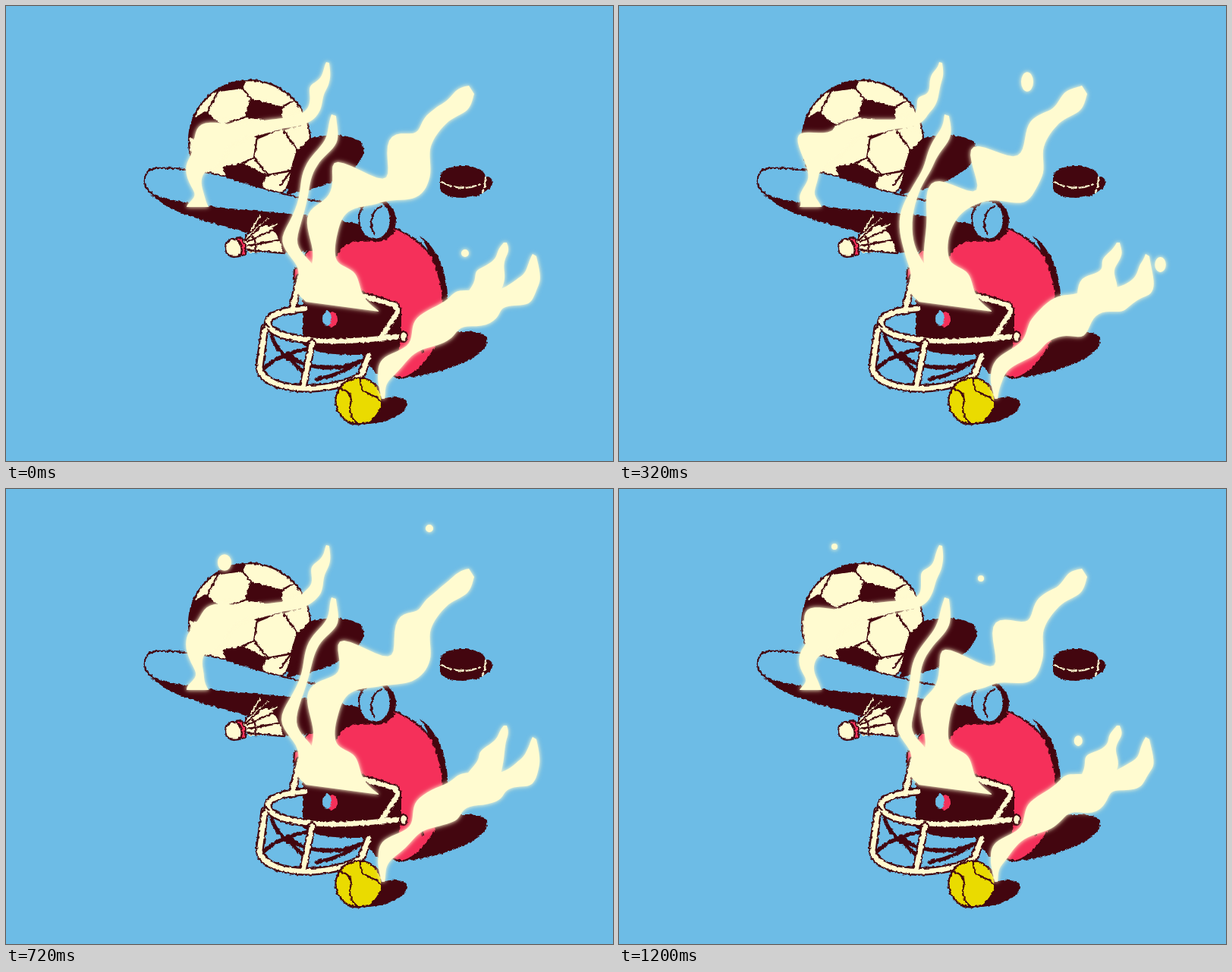
These frames come from a looping animation (800x600 px, 1280 ms). An HTML page:

```html
<!DOCTYPE html>
<html lang="en">
<head>
<meta charset="utf-8">
<title>Smoking sports gear</title>
<style>
html, body { margin: 0; width: 100%; height: 100%; overflow: hidden; background: #6dbce6; }
svg { display: block; width: 100%; height: 100%; }
.dark { fill: #43060f; }
.pink { fill: #f5305a; }
.blue { fill: #6dbce6; }
.cream { fill: #fffbd0; }
.line { fill: none; }
.edge, .line { stroke: #43060f; stroke-width: 2.3; stroke-linecap: round; stroke-linejoin: round; }
.line.pale { stroke: #fffbd0; }
.line.thick { stroke-width: 5; }
#smoke { fill: #fffbd0; filter: drop-shadow(0 0 2px #fffbd0b0) drop-shadow(0 0 3px #fffbd0a0); }
</style>
</head>
<body>
<svg viewBox="0 0 800 600">
<defs>
  <filter id="rough" filterUnits="userSpaceOnUse" x="0" y="0" width="800" height="600" color-interpolation-filters="sRGB">
    <feTurbulence type="fractalNoise" baseFrequency=".22" numOctaves="2" seed="4"/>
    <feDisplacementMap in="SourceGraphic" scale="4" xChannelSelector="R" yChannelSelector="G"/>
  </filter>
  <clipPath id="round"><circle cx="321" cy="178" r="80"/></clipPath>
  <g id="cage" fill="none" stroke-linecap="round" stroke-linejoin="round">
    <path d="M351,409Q370,400 394,399M387,358L377,402M341,424L334,478C345,515 440,508 468,487L478,461"/>
    <path d="M351,409C325,430 390,454 520,435M464,380L510,394Q518,398 515,405L495,436M403,446L391,504"/>
  </g>
</defs>

<g filter="url(#rough)">
  <!-- shadows on the ground -->
  <g class="dark">
    <path d="M380,190C400,165 455,166 469,181C480,203 450,225 415,238L370,249Z"/>
    <path d="M190,249L300,267L465,285L440,320L365,326L330,302C300,292 250,283 215,266Z"/>
    <path d="M515,491C560,490 640,465 634,438C630,426 590,428 570,432Z"/>
    <path d="M470,551C492,553 530,540 529,523C527,514 505,514 490,519Z"/>
    <path d="M615,228L638,225Q644,234 638,240L622,251Z"/>
  </g>

  <!-- football -->
  <circle class="cream edge" cx="321" cy="178" r="80"/>
  <g clip-path="url(#round)">
    <path class="dark" d="M273,114L290,90H320L312,109ZM322,122L365,133L363,153L314,147ZM263,139L285,157L276,176L238,174L246,148Z"/>
    <path class="dark" d="M285,212L312,207L344,223L336,243H298ZM384,190L405,170V225L366,250L376,217ZM327,172L365,162L331,176Z"/>
    <path class="line" d="M312,109L323,122M364,133L384,122M279,113L265,140M270,150L285,157L314,147M327,200L312,207M376,217L362,236M336,242L350,246"/>
    <path class="line" d="M388,157L365,163L384,190L376,217L345,223L327,200L331,172"/>
  </g>

  <!-- helmet -->
  <path class="pink edge" d="M383,362C385,325 420,290 470,287C530,284 580,330 581,390C581,440 550,482 525,490C510,492 495,480 488,465L515,400L392,385Z"/>
  <path class="dark" d="M546,303C576,325 590,372 578,428C577,390 575,350 546,303Z"/>
  <path class="dark" d="M391,372V445C405,460 440,460 470,460L488,486H508L521,442V402L470,380Z"/>
  <path class="dark" d="M400,290L465,287L513,296C500,315 470,307 455,312Q440,318 434,334L398,321Z"/>
  <path class="pink edge" d="M380,347Q388,342 388,353L385,363L379,360Z"/>
  <path class="line" d="M548,425Q544,440 550,456M566,414Q570,424 566,432"/>
  <ellipse class="pink" cx="429" cy="413" rx="8" ry="10"/>
  <ellipse class="blue" cx="423" cy="412" rx="6" ry="10"/>
  <path class="line thick" d="M340,478C355,463 375,456 400,452M372,458C385,477 440,486 472,465M350,434C358,462 380,466 393,485M410,492Q440,487 464,470"/>
  <use href="#cage" stroke="#43060f" stroke-width="11"/>
  <use href="#cage" stroke="#fffbd0" stroke-width="6.5"/>
  <path class="line" d="M398,443L404,439L409,445M338,426L342,419L347,424"/>
  <ellipse class="cream edge" cx="524" cy="436" rx="5" ry="7"/>

  <!-- bat -->
  <path class="blue edge" d="M197,214C230,212 270,220 290,225C350,245 400,259 470,265V290C390,271 320,274 255,263C215,257 190,252 184,238C180,225 186,215 197,214Z"/>
  <ellipse class="dark" cx="490" cy="283" rx="24" ry="28"/>
  <ellipse class="blue edge" cx="486" cy="282" rx="21" ry="26"/>
  <path class="line" d="M495,264C480,270 478,290 486,301"/>

  <!-- shuttlecock -->
  <path class="line pale" d="M323,296L334,277M334,291L345,281M347,292L357,288"/>
  <path class="cream" d="M313,308L333,290H350L358,304L366,325H319Z"/>
  <path class="line" d="M314,308L333,274M316,309L345,282M318,311L356,293M319,316L364,308M319,322L367,326M325,304Q331,312 329,325"/>
  <circle class="cream edge" cx="301" cy="319" r="12"/>
  <path class="pink edge" d="M303,306L309,305Q318,314 315,328L309,330Q314,317 303,306Z"/>

  <!-- puck -->
  <path class="dark" d="M572,226C572,206 632,206 632,226V240C628,258 574,256 572,241Z"/>
  <path class="line pale" d="M574,232Q600,246 625,235M632,226L631,239L628,246" stroke-dasharray="13 4"/>

  <!-- tennis ball -->
  <circle class="edge" fill="#eadb00" cx="465" cy="521" r="30.5"/>
  <path class="line" d="M439,504C452,507 457,514 454,524C451,536 456,546 465,551M467,491C466,505 474,512 484,514Q491,516 495,523"/>
  <path class="dark" d="M495,525Q494,543 478,550Q489,540 495,525Z"/>
</g>
<path id="smoke"/>
</svg>

<script>
const STEP = 80, STEPS = 16, CYCLE = 8;

// A wisp is a ladder of rungs half a wavelength apart:
// left x, y, right x, y, and the swell of the wave that climbs it.
const overBall = [
  [238, 265, 267, 265, 0], [244, 246, 259, 246, 6], [243, 209, 262, 222, 7],
  [244, 172, 278, 205, 8], [280, 158, 300, 180, 8], [335, 151, 325, 166, 2],
  [385, 145, 388, 158, 2], [398, 123, 412, 139, 5], [407, 104, 421, 114, 4],
  [418, 84, 427, 93, 1], [422, 74, 426, 75, 0]
];
const thin = [
  [384, 372, 415, 362, 0], [384, 347, 404, 342, 1], [368, 305, 386, 308, 5],
  [384, 248, 397, 246, 4], [402, 203, 414, 207, 3], [422, 168, 436, 176, 2],
  [429, 143, 435, 145, 0]
];
const wide = [
  [395, 390, 492, 403, 0], [384, 374, 472, 384, 0], [400, 352, 460, 353, 0],
  [403, 325, 436, 335, 2], [402, 277, 436, 302, 6], [422, 238, 452, 272, 12],
  [459, 222, 492, 258, 28], [493, 200, 537, 255, 24], [530, 175, 558, 225, 11],
  [551, 147, 560, 185, 2], [574, 131, 580, 155, 2], [592, 112, 608, 137, 1],
  [610, 105, 617, 116, 0]
];
const trunk = [
  [495, 518, 499, 518, 0], [490, 490, 503, 498, 1], [497, 466, 518, 478, 2],
  [530, 444, 550, 455, 4], [543, 412, 582, 438, 4], [580, 385, 612, 427, 8],
  [608, 376, 645, 406, 6], [650, 373, 668, 397, 3], [678, 358, 692, 386, 3],
  [688, 340, 704, 365, 2], [694, 327, 699, 330, 0]
];
const branch = [
  [600, 395, 640, 395, 0], [614, 361, 655, 372, 5], [633, 344, 655, 346, 5],
  [646, 326, 662, 325, 2], [656, 312, 660, 312, 0]
];

// Each ladder with the share of the swell its left and right edges take.
const wisps = [[overBall, 1, -.3], [thin, 1, -.6], [wide, 1, .1], [trunk, .4, 1], [branch, 1, .4]];

// Loose puffs: first and last step, start x, y, end x, y, radii, height ratio at the start.
const puffs = [
  [2, 3, 534, 168, 535, 138, 11, 9, 2.8],
  [4, 6, 538, 100, 542, 73, 8, 8, 1.6],
  [5, 6, 546, 112, 550, 99, 5, 4, 1],
  [7, 9, 549, 63, 558, 52, 6, 5, 1],
  [3, 7, 711, 348, 721, 320, 8, 5, 1.5],
  [10, 13, 476, 158, 475, 124, 8, 7, 1.3],
  [10, 13, 468, 168, 492, 152, 10, 6, 1],
  [14, 15, 476, 121, 477, 118, 5, 4, 1],
  [12, 16, 606, 350, 605, 326, 7, 5, 2],
  [9, 11, 288, 97, 285, 88, 9, 6, 1.2],
  [12, 15, 284, 84, 284, 76, 6, 4, .8]
];

const lerp = (a, b, k) => a + (b - a) * k;

// Point on a Catmull-Rom curve through the rungs.
function rungAt(rungs, u) {
  const i = Math.floor(u), k = u - i;
  const get = j => rungs[Math.max(0, Math.min(rungs.length - 1, j))];
  const [a, b, c, d] = [get(i - 1), get(i), get(i + 1), get(i + 2)];
  return b.map((v, j) => v + k / 2 * (c[j] - a[j]
    + k * (2 * a[j] - 5 * v + 4 * c[j] - d[j] + k * (3 * (v - c[j]) + d[j] - a[j]))));
}

function wispPath([rungs, leftShare, rightShare], step) {
  const left = [], right = [], detail = 8, last = (rungs.length - 1) * detail;
  for (let n = 0; n <= last; n++) {
    const u = n / detail, [lx, ly, rx, ry, swell] = rungAt(rungs, u);
    const push = swell * Math.cos(Math.PI * u - 2 * Math.PI * (step - 1) / CYCLE);
    const width = Math.hypot(lx - rx, ly - ry) || 1;
    const dx = (lx - rx) / width * push, dy = (ly - ry) / width * push;
    left.push([lx + dx * leftShare, ly + dy * leftShare]);
    right.unshift([rx - dx * rightShare, ry - dy * rightShare]);
  }
  return 'M' + left.concat(right).join('L') + 'Z';
}

function puffPath([from, to, x0, y0, x1, y1, r0, r1, tall], step) {
  const now = step < from ? step + STEPS : step;
  if (now > to) return '';
  const k = (now - from) / (to - from);
  const x = lerp(x0, x1, k), y = lerp(y0, y1, k), r = lerp(r0, r1, k);
  const arc = `A${r},${r * lerp(tall, 1, k)} 0 0 1 `;
  return `M${x - r},${y}${arc}${x + r},${y}${arc}${x - r},${y}Z`;
}

const smoke = document.getElementById('smoke');
let shown = -1;

function draw() {
  const step = Math.floor(performance.now() / STEP) % STEPS;
  if (step !== shown) {
    shown = step;
    const parts = [...wisps.map(w => wispPath(w, step)), ...puffs.map(p => puffPath(p, step))];
    smoke.setAttribute('d', parts.join(''));
  }
  requestAnimationFrame(draw);
}
draw();
</script>
</body>
</html>
```
